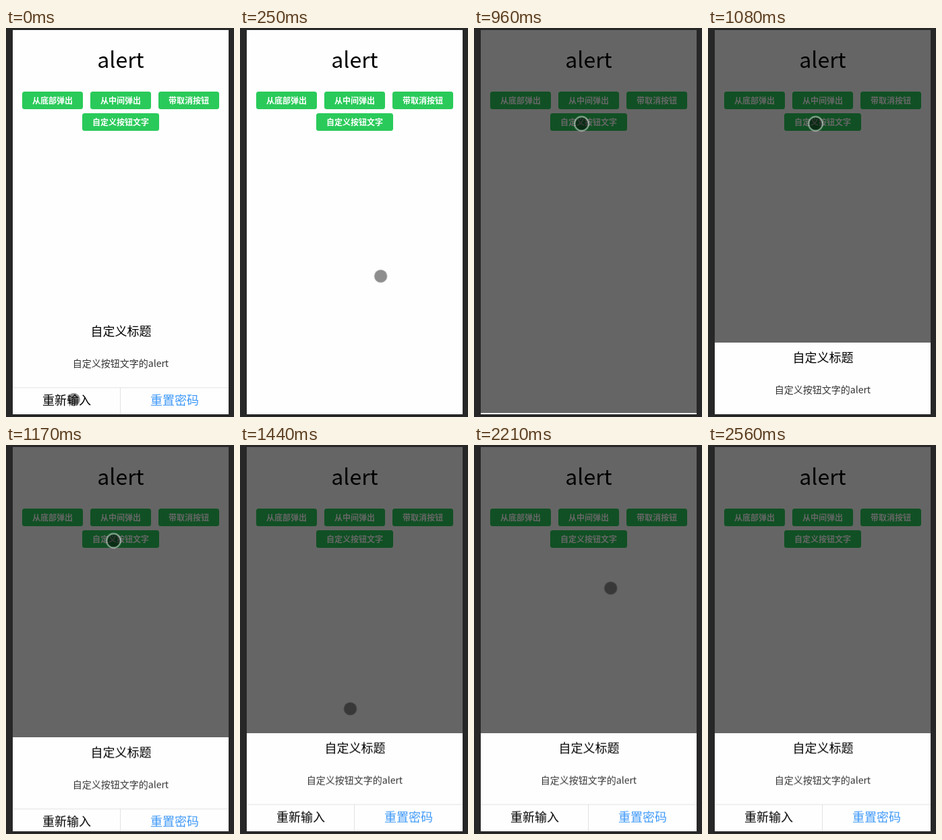
An HTML page for the animation above (3.02 s loop, 338 px wide and 575 px high).

```html
<!DOCTYPE html>
<html lang="zh-CN">
<head>
<meta charset="utf-8">
<title>alert</title>
<style>
  html, body { margin: 0; width: 100%; height: 100%; overflow: hidden; background: #272727; }
  svg { display: block; width: 338px; height: 575px; }
  text { font-family: "Noto Sans CJK SC", "Noto Sans CJK", "Noto Sans", sans-serif; text-anchor: middle; }
  h1 { margin: 0; }

  .heading { font-size: 32px; font-weight: 500; }
  .btn rect { fill: #2aca5a; }
  .btn text { font-size: 12px; font-weight: 700; fill: #fff; }
  .big { font-size: 18px; }
  .body { font-size: 14px; fill: #333; }
  .primary { fill: #3d98f8; }
  .line { fill: #e2e2e2; }

  .mask, .sheet, .cursor, .ring { animation: 3020ms linear infinite; }
  .mask { animation-name: mask; animation-timing-function: step-end; }
  .sheet { animation-name: sheet; }
  .cursor { animation-name: move; }
  .ring { animation-name: press; animation-timing-function: step-end; }

  @keyframes mask {
    0% { opacity: 0; }
    31.62%, 100% { opacity: .6; }
  }
  @keyframes sheet {
    0% { transform: translateY(0); animation-timing-function: ease; }
    8.25%, 31.46% { transform: translateY(146px); animation-timing-function: ease; }
    41.39%, 100% { transform: translateY(0); }
  }
  @keyframes press {
    0% { opacity: 1; }
    .66% { opacity: 0; }
    24.7% { opacity: 1; }
    41.4%, 100% { opacity: 0; }
  }
  @keyframes move {
    0%, .66% { transform: translate(100.5px, 549px); }
    3.6% { transform: translate(150px, 480px); }
    8.28% { transform: translate(208.5px, 367.5px); }
    10.3% { transform: translate(216px, 320px); }
    13% { transform: translate(198px, 240px); }
    15.3% { transform: translate(168px, 182px); }
    17.55%, 22.19% { transform: translate(160px, 154px); }
    24.7%, 41.4% { transform: translate(159.5px, 141.5px); }
    44% { transform: translate(159.5px, 240px); }
    46.5% { transform: translate(162px, 350px); }
    49% { transform: translate(165px, 432px); }
    53% { transform: translate(160px, 470px); }
    56% { transform: translate(140px, 512px); }
    58.5% { transform: translate(116px, 505px); }
    61.59% { transform: translate(129.5px, 490.5px); }
    64% { transform: translate(140px, 470px); }
    66.89%, 67.88% { transform: translate(134px, 450px); }
    71% { transform: translate(196px, 300px); }
    74% { transform: translate(205px, 180px); }
    76% { transform: translate(250px, 86px); }
    79% { transform: translate(309px, 200px); }
    82% { transform: translate(300px, 420px); }
    84.5% { transform: translate(285px, 556px); }
    84.6%, 100% { transform: translate(-40px, -40px); }
  }
</style>
</head>
<body>
<svg viewBox="0 0 338 575">
  <clipPath id="screen"><rect x="10" y="3" width="320" height="568"/></clipPath>
  <rect width="338" height="575" fill="#272727"/>
  <g clip-path="url(#screen)">
    <rect x="10" y="3" width="320" height="568" fill="#fefefe"/>
    <text class="heading" x="170" y="58.5">alert</text>
    <g class="btn">
      <rect x="24" y="94" width="90" height="26" rx="3.5"/>
      <rect x="125" y="94" width="90" height="26" rx="3.5"/>
      <rect x="226" y="94" width="90" height="26" rx="3.5"/>
      <rect x="113" y="126" width="114" height="26" rx="3.5"/>
      <text x="69" y="111.5">从底部弹出</text>
      <text x="170" y="111.5">从中间弹出</text>
      <text x="271" y="111.5">带取消按钮</text>
      <text x="170" y="143.5">自定义按钮文字</text>
    </g>

    <rect class="mask" x="10" y="3" width="320" height="568"/>

    <g class="sheet">
      <rect x="10" y="426" width="320" height="145" fill="#fefefe"/>
      <text class="big" x="170.5" y="455">自定义标题</text>
      <text class="body" x="170" y="501">自定义按钮文字的alert</text>
      <rect class="line" x="10" y="531" width="320" height="1"/>
      <rect class="line" x="169" y="531" width="1" height="40"/>
      <text class="big" x="90" y="557">重新输入</text>
      <text class="big primary" x="250" y="557">重置密码</text>
    </g>

    <g class="cursor">
      <circle r="9.6" fill="#000" fill-opacity=".44"/>
      <circle class="ring" r="10.4" fill="none" stroke="#fff" stroke-opacity=".55" stroke-width="2"/>
    </g>
  </g>
</svg>
</body>
</html>
```
